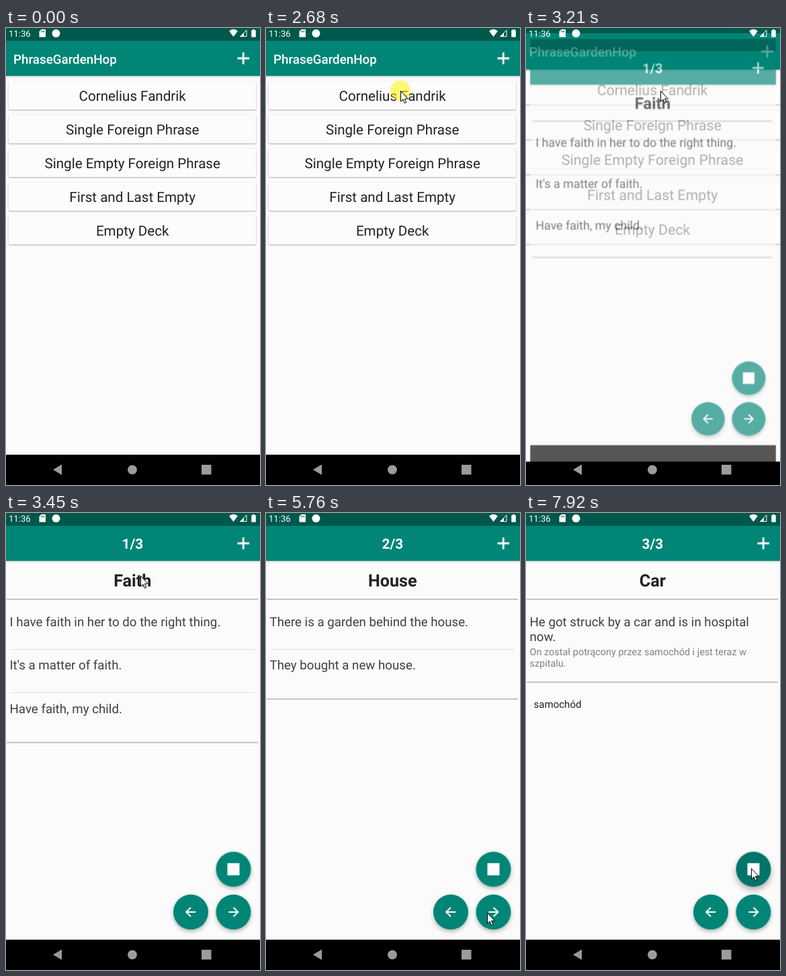
An HTML page that plays this animation: 378x678 px, repeating every 8000 ms.

```html
<!DOCTYPE html>
<html lang="en">
<head>
<meta charset="utf-8">
<title>Flash card app</title>
<style>
  html, body { margin: 0; width: 100%; height: 100%; overflow: hidden; background: #000; }
  svg { display: block; width: 378px; height: 678px; font-family: Roboto, sans-serif; text-rendering: geometricPrecision; }
  .screen { transform-origin: 189px 339px; }
  .paper { fill: #fbfbfb; }
  .status { fill: #00574b; }
  .bar { fill: #008577; filter: drop-shadow(0 1px 1.5px rgba(0, 0, 0, .25)); }
  .card { fill: #fcfcfc; filter: drop-shadow(0 1px 1px rgba(0, 0, 0, .32)); }
  .fab { fill: #008577; filter: drop-shadow(0 3px 3px rgba(0, 0, 0, .28)); }
  .icon { fill: none; stroke: #fff; stroke-width: 2; }
  .plus { stroke-width: 2.8; }
  .rule { stroke: #c4c4c4; stroke-width: 2; }
  .thin { stroke: #e0e0e0; stroke-width: 1; }
  .mid { text-anchor: middle; }
  .deck { font-size: 20.6px; fill: #222; }
  .app { font-size: 18.8px; font-weight: 500; fill: #fff; }
  .count { font-size: 20.8px; font-weight: 700; fill: #fff; }
  .word { font-size: 25.2px; font-weight: 700; fill: #222; }
  .line { font-size: 18.72px; fill: #404040; }
  .trans { font-size: 14.45px; fill: #808080; }
  .gloss { font-size: 15.05px; fill: #222; }
  .clock { font-size: 13.1px; fill: #fff; }
</style>
</head>
<body>
<svg id="stage" viewBox="0 0 378 678"></svg>
<script>
const LOOP = 8000;
const stage = document.getElementById('stage');

const text = (cls, x, y, s) => `<text class="${cls}" x="${x}" y="${y}">${s}</text>`;
const rect = (cls, x, y, w, h) => `<rect class="${cls}" x="${x}" y="${y}" width="${w}" height="${h}"/>`;
const rule = (cls, x1, x2, y) => `<path class="${cls}" d="M${x1} ${y}H${x2}"/>`;

const chrome = `
  ${rect('paper', -3, 0, 384, 678)}
  ${rect('bar', -3, 19, 384, 52)}
  ${rect('status', -3, 0, 384, 19)}
  ${rect('', -3, 633, 384, 45)}
  <path class="icon plus" d="M344.5 45h17.5M353.2 36.3v17.5"/>`;

const decks = ['Cornelius Fandrik', 'Single Foreign Phrase', 'Single Empty Foreign Phrase',
  'First and Last Empty', 'Empty Deck'];
const list = chrome + text('app', 11, 52.5, 'PhraseGardenHop') + decks.map((name, i) =>
  `<rect class="card" x="4" y="${79 + i * 50}" width="368" height="42" rx="2"/>` +
  text('deck mid', 188.2, 108 + i * 50, name)).join('');

const page = (n, word, rows, dividers, end) => `<g id="page${n}">
  ${text('count mid', 188.3, 53, n + '/3')}
  ${text('word mid', 188.3, 109, word)}
  ${rule('rule', 1, 375, 128)}
  ${rows.map(([y, s]) => text('line', 5.5, y, s)).join('')}
  ${dividers.map(y => rule('thin', 6, 370, y)).join('')}
  ${rule('rule', 1, 375, end)}</g>`;

const fab = (id, x, y, icon) => `<g transform="translate(${x} ${y})">
  <circle class="fab" id="${id}" r="26"/>${icon}</g>`;
const arrow = dir => `<path class="icon" transform="scale(${dir} 1)" d="M-7.3 0H6.5M0 -6.8L6.8 0L0 6.8"/>`;

const cards = chrome +
  page(1, 'Faith', [[167.5, 'I have faith in her to do the right thing.'],
    [232, "It's a matter of faith."], [296.5, 'Have faith, my child.']], [202.5, 266.5], 340.5) +
  page(2, 'House', [[167.5, 'There is a garden behind the house.'],
    [232, 'They bought a new house.']], [202.5], 276) +
  page(3, 'Car', [[167.5, 'He got struck by a car and is in hospital'], [189.5, 'now.']], [], 251) +
  `<g id="polish">
    ${text('trans', 5.5, 210.5, 'On został potrącony przez samochód i jest teraz w')}
    ${text('trans', 5.5, 227.5, 'szpitalu.')}
    ${text('gloss', 11.5, 289, 'samochód')}</g>` +
  fab('translate', 338.5, 528.5, '<rect x="-9" y="-9" width="18" height="18" fill="#fff"/>') +
  fab('prev', 275, 592, arrow(-1)) +
  fab('next', 338.5, 592, arrow(1));

const system = `
  ${text('clock', 4, 13, '11:36')}
  <g fill="#fff">
    <path d="M52.5 2H59V13.5H49.5V5.2Z"/>
    <path d="M52.8 4v2.4M54.8 4v2.4M56.8 4v2.4" stroke="#00574b"/>
    <circle cx="74.5" cy="8" r="6"/>
    <path d="M332 4.6Q338.5 -1 345 4.6L338.5 13Z"/>
    <path d="M348.6 12.6L358 3V12.6Z" fill="none" stroke="#fff"/>
    <path d="M348 13L354 7V13Z"/>
    <path d="M365.2 3.2h1.8V2h3v1.2h1.8V13.4h-6.6Z"/>
  </g>
  <g fill="#9b9b9b">
    <path d="M70 655.3L83 647.5V663Z"/>
    <circle cx="188" cy="655.3" r="6.9"/>
    ${rect('', 291, 648, 14.5, 14.5)}
  </g>`;

const pointer = `
  <g id="pointer">
    <circle id="tap" r="15" fill="#fff200" opacity="0"/>
    <path d="M.5 .5V16L4 12.8L6.4 18.5L8.8 17.4L6.4 12H11.3Z" fill="#fff" stroke="#000"/>
  </g>`;

stage.innerHTML = `
  <g class="screen" id="list">${list}</g>
  <g class="screen" id="cards">${cards}</g>
  ${system}${pointer}`;

// Hard steps: each [time, value] holds until the next one.
function play(id, prop, steps) {
  const frames = steps.map(([t, v]) => ({ offset: t / LOOP, [prop]: v, easing: 'step-end' }));
  frames.push({ offset: 1, [prop]: steps[steps.length - 1][1] });
  document.getElementById(id).animate(frames, { duration: LOOP, iterations: Infinity });
}

// Spreads positions evenly from time t0 to t1.
const walk = (t0, t1, pts) => pts.map((p, i) => [t0 + (t1 - t0) * i / (pts.length - 1), p]);

const path = [
  ...walk(360, 1130, [[275, 628], [262, 596], [240, 545], [210, 480], [178, 400], [163, 335],
    [159, 285], [161, 235], [172, 185], [186, 138], [200, 96]]),
  [1210, [200, 93]],
  ...walk(3910, 4520, [[203, 88], [222, 83], [258, 100], [296, 150], [327, 230], [326, 300],
    [318, 375], [311, 480], [309, 555]]),
  ...walk(4900, 5130, [[312, 565], [320, 580], [327, 590], [329, 593]]),
  ...walk(7000, 7380, [[330, 588], [331, 575], [333, 560], [334, 545], [335, 533], [335, 527]])
];
play('pointer', 'transform', [[0, [-40, -40]], ...path].map(([t, [x, y]]) => [t, `translate(${x}px, ${y}px)`]));
play('tap', 'opacity', [[0, 0], [2680, .55], [2910, 0], [5450, .55], [5605, 0],
  [6470, .55], [6620, 0], [7610, .55], [7770, 0]]);

// Screen change: time, scale of the list, scale and opacity of the cards.
const zoom = [[0, 1, .85, 0], [3060, 1.01, .88, .15], [3140, 1.035, .952, .66], [3220, 1.045, .982, .95],
  [3290, 1.048, .992, 1], [3370, 1.05, .998, 1], [3450, 1.05, 1, 1]];
play('list', 'transform', zoom.map(z => [z[0], `scale(${z[1]})`]));
play('cards', 'transform', zoom.map(z => [z[0], `scale(${z[2]})`]));
play('cards', 'opacity', zoom.map(z => [z[0], z[3]]));

play('page1', 'opacity', [[0, 1], [5682, 0]]);
play('page2', 'opacity', [[0, 0], [5682, 1], [6700, 0]]);
play('page3', 'opacity', [[0, 0], [6700, 1]]);
play('polish', 'opacity', [[0, 0], [7850, 1]]);

function press(id, spans) {
  const steps = (off, on) => [[0, off], ...spans.flatMap(([a, b]) => b < LOOP ? [[a, on], [b, off]] : [[a, on]])];
  play(id, 'fill', steps('#008577', '#007468'));
  play(id, 'filter', steps('drop-shadow(0 3px 3px rgba(0, 0, 0, .28))', 'drop-shadow(0 5px 5px rgba(0, 0, 0, .3))'));
}
press('next', [[5605, 5760], [6620, 6770]]);
press('translate', [[7770, LOOP]]);
</script>
</body>
</html>
```
